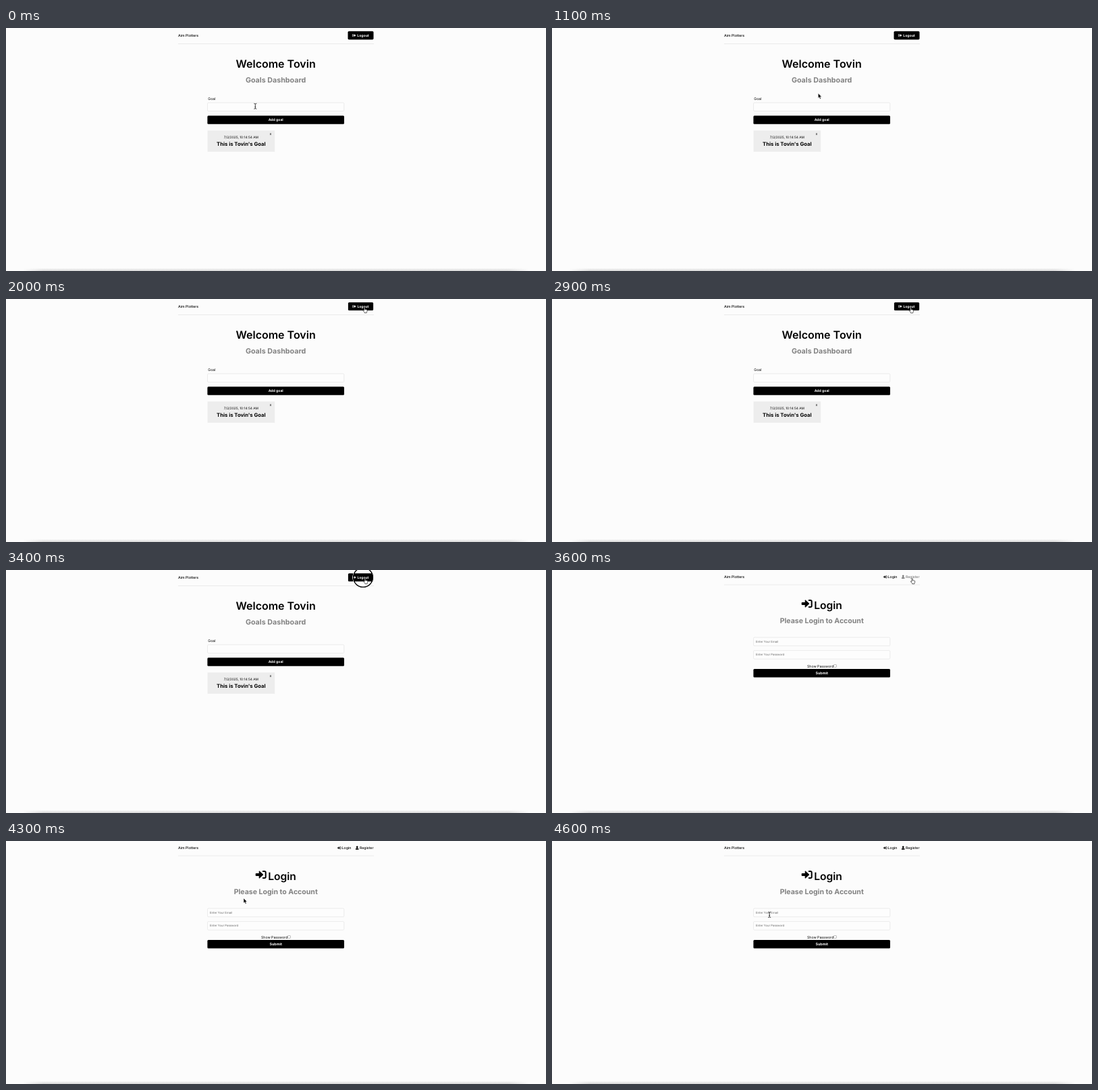
An HTML page for the animation above (4700 ms loop, 800 by 361 pixels).

```html
<!DOCTYPE html>
<html lang="en">
<head>
<meta charset="utf-8">
<title>Goals dashboard</title>
<style>
  html, body { margin: 0; width: 100%; height: 100%; overflow: hidden; background: #fcfcfc; }
  svg { display: block; width: 100vw; height: 100vh; }
  text { font: 400 5.2px Inter, "Open Sans", sans-serif; text-rendering: geometricPrecision; }
  .title { font-size: 16px; font-weight: 600; }
  .sub { font-size: 10.7px; font-weight: 700; fill: #828282; }
  .button { font-size: 5.1px; font-weight: 700; fill: #fff; }
  .hint { font-size: 4.3px; fill: #666; }
  .mid { text-anchor: middle; }
  .nav { font-weight: 500; }
  .rule { stroke: #e6e6e6; stroke-width: .8; }
  .field { fill: #fdfdfd; stroke: #e4e4e4; stroke-width: .7; }
</style>
</head>
<body>
<svg viewBox="0 0 800 361">
  <defs>
    <g id="arrow"><path d="M.5 6.5h5V2.8L11.2 8l-5.7 5.2V9.5h-5z" fill="currentColor" stroke="currentColor" stroke-linejoin="round"/></g>
    <path id="bracket" d="M10.3 3h3A1.7 1.7 0 0 1 15 4.7v6.6a1.7 1.7 0 0 1-1.7 1.7h-3" fill="none" stroke="currentColor" stroke-width="2"/>
    <g id="sign-in"><use href="#arrow"/><use href="#bracket"/></g>
    <g id="sign-out"><use href="#arrow" x="4.3"/><use href="#bracket" transform="matrix(-1 0 0 1 16 0)"/></g>
    <linearGradient id="fade" x2="0" y2="1">
      <stop stop-color="#ddd" stop-opacity="0"/><stop offset="1" stop-color="#d4d4d4"/>
    </linearGradient>
    <linearGradient id="sides">
      <stop stop-color="#000"/><stop offset=".04" stop-color="#fff"/>
      <stop offset=".96" stop-color="#fff"/><stop offset="1" stop-color="#000"/>
    </linearGradient>
    <mask id="ends"><rect x="25" y="350" width="750" height="11" fill="url(#sides)"/></mask>
  </defs>

  <rect width="800" height="361" fill="#fcfcfc"/>
  <rect x="25" y="356.5" width="750" height="4.5" fill="url(#fade)" mask="url(#ends)"/>

  <g id="dashboard">
    <text class="nav" x="255" y="13">Aim Plotters</text>
    <path class="rule" d="M255 23.5h290"/>
    <g id="logout">
      <rect x="506.5" y="4.8" width="38" height="12.4" rx="1.6"/>
      <use href="#sign-out" transform="translate(513 8.4) scale(.33)" color="#fff"/>
      <text class="button" x="520.3" y="12.9">Logout</text>
    </g>
    <text class="title mid" x="399.6" y="59.3">Welcome Tovin</text>
    <text class="sub mid" x="399.6" y="80.8">Goals Dashboard</text>
    <text x="299.3" y="107">Goal</text>
    <rect class="field" x="298.5" y="111" width="202.3" height="12.6" rx="1.5"/>
    <rect x="298.4" y="130.2" width="202.6" height="12.6" rx="1.5"/>
    <text class="button mid" x="399.7" y="138.3">Add goal</text>
    <rect x="298.5" y="152.3" width="99.7" height="31.5" fill="#ededed"/>
    <text class="mid" x="348.3" y="164" style="font-size:4.8px">7/2/2025, 10:14:54 AM</text>
    <text class="mid" x="348.3" y="174.6" style="font-size:7.7px;font-weight:700">This is Tovin's Goal</text>
    <text class="mid" x="391.8" y="159">x</text>
  </g>

  <g id="login">
    <text class="nav" x="255" y="12.1">Aim Plotters</text>
    <path class="rule" d="M255 22h290"/>
    <use href="#sign-in" transform="translate(491 7.6) scale(.34)"/>
    <text class="nav" x="497.6" y="12.1">Login</text>
    <g id="register">
      <circle cx="520.2" cy="8.9" r="1.35"/>
      <path d="M517.9 12.8v-.7q0-1.5 1.5-1.5h1.6q1.5 0 1.5 1.5v.7z"/>
      <text class="nav" x="524" y="12.1">Register</text>
    </g>
    <use href="#sign-in" transform="translate(369.7 42)"/>
    <text class="title" x="388.2" y="57.6" style="font-size:15.6px">Login</text>
    <text class="sub mid" x="399.7" y="79.3" style="font-size:10.55px">Please Login to Account</text>
    <rect class="field" x="298.5" y="100.1" width="202.3" height="12.6" rx="1.5"/>
    <text class="hint" x="302" y="107.9">Enter Your Email</text>
    <rect class="field" x="298.5" y="119.6" width="202.3" height="12.6" rx="1.5"/>
    <text class="hint" x="302" y="127.4">Enter Your Password</text>
    <text x="378" y="144.5">Show Password</text>
    <rect x="417.6" y="140.6" width="3.8" height="3.8" rx=".6" fill="#fff" stroke="#777" stroke-width=".5"/>
    <rect x="298.4" y="147" width="202.6" height="12.4" rx="1.5"/>
    <text class="button mid" x="399.7" y="155" style="font-size:5.3px">Submit</text>
  </g>

  <g id="status">
    <path d="M0 357.6h108.6q1.6 0 1.6 1.6V361H0z" fill="#333"/>
    <text x="1" y="362.4" style="font-size:4px" fill="#bbb">https://my-aims-page-4821-front.invalid/register</text>
  </g>

  <g id="ripple" fill="none">
    <circle cx="529" cy="11" r="15.4" stroke="#fff" stroke-width="1"/>
    <circle cx="529" cy="11" r="14.4" stroke="#000" stroke-width="1.4"/>
  </g>

  <g id="cursor">
    <path id="beam" d="M-2-4Q0-4 0-3Q0-4 2-4M0-3V3M-2 4Q0 4 0 3Q0 4 2 4M-.8 1H.8" fill="none" stroke="#111" stroke-width=".8"/>
    <path id="pointer" d="M0 0v7.2l1.6-1.5 1.2 2.7 1.3-.6-1.2-2.6h2.3z" stroke="#fff" stroke-width=".5"/>
    <path id="hand" d="M-1.6-3.2q0-.8.7-.8t.7.8v2.3q.5-.5 1.1 0 .6-.4 1.1.2.9-.3 1 .7v1.6q0 .8-.7 1.6v.8h-3.2v-.8L-3 1q-.4-.8.2-1 .6-.1 1.2.7z" fill="#fff" stroke="#111" stroke-width=".65" stroke-linejoin="round"/>
  </g>
</svg>
<script>
const $ = id => document.getElementById(id);
const show = (id, on) => { $(id).style.display = on ? "" : "none"; };
const LOOP = 4700;

// [start ms, x, y, cursor shape]
const poses = [
  [0, 369.3, 116.2, "beam"], [500, 371, 116.9, "beam"],
  [1100, 394.3, 97, "pointer"], [1200, 432, 66, "pointer"], [1300, 470, 42, "pointer"],
  [1400, 500, 27, "pointer"], [1500, 518, 18.4, "pointer"],
  [1600, 528.6, 15, "hand"], [1700, 530.8, 16, "hand"], [1800, 531.6, 16.9, "hand"],
  [2000, 532, 16.6, "hand"], [2900, 532.4, 16.8, "hand"], [3000, 532.8, 16.6, "hand"],
  [3600, 534.6, 16.6, "hand"],
  [4000, 468.2, 27.5, "pointer"], [4100, 425, 49, "pointer"], [4200, 385, 68, "pointer"],
  [4300, 352, 85, "pointer"], [4400, 331, 97, "pointer"],
  [4500, 320.6, 107.4, "beam"], [4600, 322.2, 109.5, "beam"]
];

const statusOpacity = t =>
  t < 3700 || t >= 4200 ? 0 : t < 3800 || t >= 4100 ? .5 : 1;

function draw(now) {
  const t = now % LOOP;
  const [, x, y, shape] = poses.findLast(p => p[0] <= t);
  const loggedOut = t >= 3600;
  show("dashboard", !loggedOut);
  show("login", loggedOut);
  show("ripple", t >= 3400 && !loggedOut);
  for (const id of ["beam", "pointer", "hand"]) show(id, id === shape);
  $("cursor").setAttribute("transform", `translate(${x} ${y})`);
  $("logout").setAttribute("transform",
    t >= 1600 ? "translate(525.5 11) scale(.98) translate(-525.5 -11)" : "");
  $("register").setAttribute("fill", t < 4000 ? "#777" : "#000");
  $("status").setAttribute("opacity", statusOpacity(t));
}

const start = performance.now();
function tick() {
  draw(performance.now() - start);
  requestAnimationFrame(tick);
}
tick();
</script>
</body>
</html>
```
